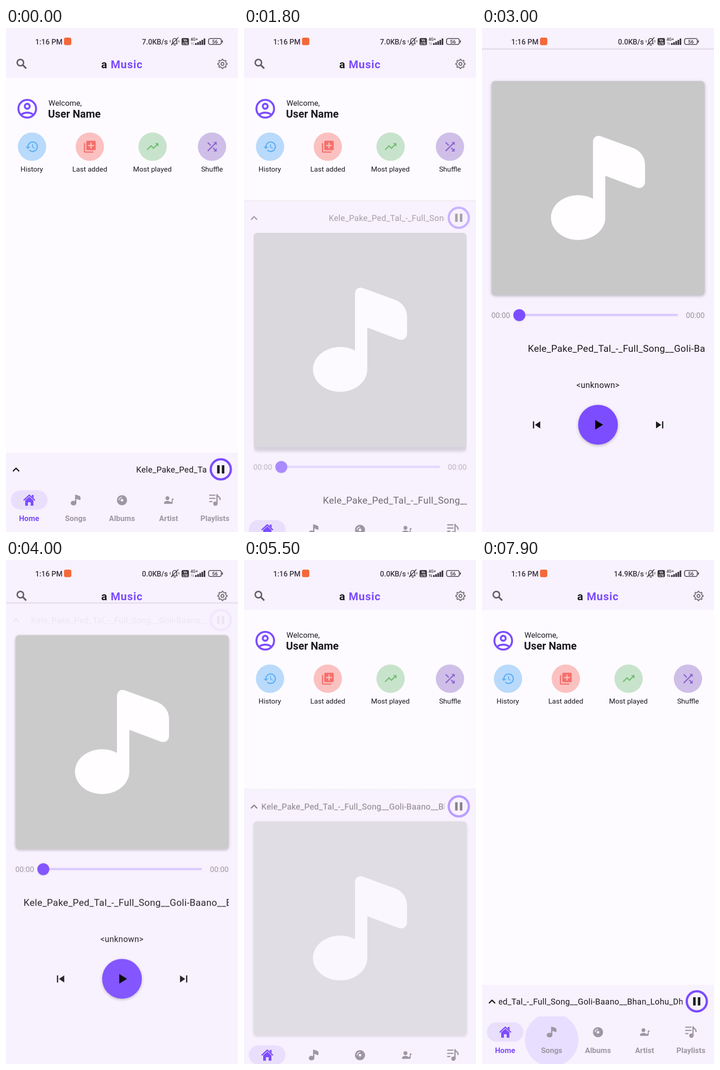
Animation, 508 px wide and 1102 px high, one loop 8000 ms. Source, as an HTML page:

```html
<!DOCTYPE html>
<html lang="en">
<head>
<meta charset="utf-8">
<title>Music player</title>
<style>
/* --p: how far the sheet is open; --m: marquee distance from its resting place */
@property --p { syntax: '<number>'; inherits: true; initial-value: 0; }
@property --m { syntax: '<number>'; inherits: true; initial-value: 247; }
html, body { margin: 0; width: 100%; height: 100%; overflow: hidden; background: #fdfbff; }
svg { display: block; width: 100vw; height: 100vh; font-family: Roboto, sans-serif; fill: #1c1b1f;
  animation: open 8s linear infinite, marquee 8s linear infinite; }
@keyframes open {
  0%, 6.9% { --p: 0; }
  11.25% { --p: .15; }
  17.5% { --p: .355; }
  27.5% { --p: .891; }
  31.5%, 46.5% { --p: 1; }
  50% { --p: .9456; }
  60% { --p: .7404; }
  78.75% { --p: .1905; }
  87.5%, 100% { --p: 0; }
}
@keyframes marquee {
  0% { --m: 247; }
  17.5% { --m: 168; }
  27.5% { --m: 127; }
  45% { --m: 40; }
  53.75%, 69% { --m: 0; }
  78.75% { --m: -38.5; }
  96.25%, 100% { --m: -108; }
}
.sheet { transform: translateY(calc(930px - 882px * var(--p))); }
.nav { transform: translateY(calc(998px + 104px * var(--p))); }
.full { opacity: var(--p); }
.mini { opacity: calc(1 - var(--p)); }
.mini-title { font-size: 18.1px; transform: translateX(calc(38px + 1px * var(--m))); }
.title { font-size: 20.7px; transform: translateX(calc(21px + 1.03px * var(--m))); }
.spaced { letter-spacing: .0179em; }
.raised { animation: shade 8s step-end infinite; }
.thumb { filter: drop-shadow(0 1px 1px rgba(0, 0, 0, .2)); }
/* while the sheet opens, shadows fall lower and are cut off at the sides */
@keyframes shade {
  0% { filter: drop-shadow(0 10px 3px rgba(0, 0, 0, .22)); clip-path: inset(0 0 -20px); }
  31.5%, 100% { filter: drop-shadow(0 2px 3px rgba(0, 0, 0, .25)); clip-path: inset(-20px); }
}
.rate { font-size: 15.8px; animation: 8s step-end infinite; }
.rate.a { animation-name: rate-a; }
.rate.b { animation-name: rate-b; }
.rate.c { animation-name: rate-c; }
@keyframes rate-a { 0% { opacity: 1; } 25%, 100% { opacity: 0; } }
@keyframes rate-b { 0% { opacity: 0; } 25% { opacity: 1; } 73.75%, 100% { opacity: 0; } }
@keyframes rate-c { 0% { opacity: 0; } 73.75%, 100% { opacity: 1; } }
.arrows { animation: arrows 8s step-end infinite; }
@keyframes arrows { 0% { opacity: .45; } 53%, 100% { opacity: 1; } }
.ripple { transform-origin: 152.5px 51px; animation: ripple 8s ease-out infinite; }
@keyframes ripple {
  0%, 93.4% { opacity: 0; transform: scale(.3); }
  94.8% { opacity: 1; transform: scale(.7); }
  96.5%, 100% { opacity: 1; transform: scale(1); }
}
.status { fill: #38343c; font-weight: 500; }
.purple { fill: #7c4dff; }
.bold { font-weight: 700; }
.mid { text-anchor: middle; }
.end { text-anchor: end; }
.line { fill: none; stroke: currentColor; stroke-linecap: round; stroke-linejoin: round; }
</style>
</head>
<body>
<svg viewBox="0 0 508 1102" preserveAspectRatio="none">
  <defs>
    <clipPath id="mini-clip"><rect x="37" width="402" height="72"/></clipPath>
    <clipPath id="title-clip"><rect x="21" y="620" width="467" height="70"/></clipPath>
    <clipPath id="nav-clip"><rect width="508" height="104"/></clipPath>
    <linearGradient id="edge" x2="0" y2="1">
      <stop stop-color="#000" stop-opacity="0"/>
      <stop offset="1" stop-color="#000" stop-opacity=".12"/>
    </linearGradient>
    <g id="note">
      <path d="M243 202C243 191 251 185 261 189L330 214C347 220 357 235 357 251V288C357 299 348 304 339 301L270 275V367H243Z"/>
      <ellipse cx="210.500" cy="366.500" rx="59.500" ry="49"/>
    </g>
  </defs>

  <rect width="508" height="1102" fill="#fdfbff"/>

  <!-- Home page -->
  <g class="line" color="#7c4dff" transform="translate(20.700 150.700) scale(2.15)" stroke-width="2">
    <circle cx="12" cy="12" r="9"/>
    <circle cx="12" cy="9.500" r="2.500"/>
    <path d="M6 18C7.400 16.700 9.500 16 12 16S16.600 16.700 18 18"/>
  </g>
  <text x="93" y="169.700" font-size="16.800">Welcome,</text>
  <text x="92" y="195.500" font-size="23.200" class="bold">User Name</text>

  <circle cx="57" cy="259.500" r="31" fill="#b9dafb"/>
  <circle cx="183.500" cy="259.500" r="31" fill="#fbc1c1"/>
  <circle cx="321" cy="259.500" r="31" fill="#c8e3cb"/>
  <circle cx="451" cy="259.500" r="31" fill="#cfbfe8"/>
  <path fill="#5fb0f5" transform="translate(41.500 244) scale(1.294)" d="M13 3a9 9 0 0 0-9 9H1l3.890 3.890.07.14L9 12H6c0-3.870 3.130-7 7-7s7 3.130 7 7-3.130 7-7 7c-1.930 0-3.680-.79-4.940-2.060l-1.420 1.420A8.950 8.950 0 0 0 13 21a9 9 0 0 0 0-18zm-1 5v5l4.280 2.540.72-1.210-3.500-2.080V8z"/>
  <path fill="#f4706c" transform="translate(168 244) scale(1.294)" d="M4 6H2v14c0 1.100.9 2 2 2h14v-2H4zm16-4H8c-1.100 0-2 .9-2 2v12c0 1.100.9 2 2 2h12c1.100 0 2-.9 2-2V4c0-1.100-.9-2-2-2zm-1 9h-4v4h-2v-4H9V9h4V5h2v4h4z"/>
  <path fill="#72bd77" transform="translate(305.500 244) scale(1.294)" d="M16 6l2.290 2.290-4.880 4.880-4-4L2 16.590 3.410 18l6-6 4 4 6.300-6.290L22 12V6z"/>
  <path fill="#8c65cf" transform="translate(435.500 244) scale(1.294)" d="M10.590 9.170L5.410 4 4 5.410l5.170 5.170zM14.500 4l2.040 2.040L4 18.590 5.410 20 17.960 7.460 20 9.500V4zm.33 9.410l-1.410 1.410 3.130 3.130L14.500 20H20v-5.500l-2.040 2.040z"/>
  <g class="mid" font-size="15.500">
    <text x="56.500" y="314">History</text>
    <text x="183.500" y="314">Last added</text>
    <text x="320.500" y="314">Most played</text>
    <text x="451" y="314">Shuffle</text>
  </g>

  <!-- Header and status bar -->
  <rect width="508" height="109" fill="#f8f1fe"/>
  <g fill="none" stroke="#65606a">
    <circle cx="31.500" cy="75.700" r="7" stroke-width="3.200"/>
    <path d="M36.500 80.700L44.300 88.500" stroke-width="3.800"/>
  </g>
  <text x="208.500" y="88" font-size="24" letter-spacing=".9" class="bold">a <tspan class="purple">Music</tspan></text>
  <g transform="translate(474 78.500)" fill="none" stroke="#65606a" stroke-width="2">
    <circle r="9" fill="#65606a" stroke="none"/>
    <circle r="9.600" stroke-width="2.800" pathLength="16" stroke-dasharray="1.100 .9" stroke-dashoffset=".55"/>
    <circle r="7.200" fill="#f8f1fe" stroke="none"/>
    <circle r="8" stroke="#f8f1fe" pathLength="16" stroke-dasharray=".5 1.500" stroke-dashoffset=".25"/>
    <circle r="3.200"/>
  </g>
  <g class="status">
    <text x="64" y="35.500" font-size="16">1:16 PM</text>
    <rect x="127" y="21" width="16" height="16.500" rx="4" fill="#f4683a"/>
    <g class="end">
      <text class="rate a" x="354.500" y="35.500">7.0KB/s</text>
      <text class="rate b" x="354.500" y="35.500">0.0KB/s</text>
      <text class="rate c" x="354.500" y="35.500">14.9KB/s</text>
    </g>
    <g class="line" color="#38343c" stroke-width="1.700">
      <path d="M363 34.500H375M365 34V28C365 21 374 21 374 28V34M368 37.500H371M362 37L377 21"/>
      <path d="M359.500 27V31M378.500 27V31" stroke-width="1.300"/>
    </g>
    <rect x="384.500" y="22" width="16" height="15.500" rx="3"/>
    <g class="mid bold" font-size="6.800" fill="#fff">
      <text x="392.500" y="29">Vo</text>
      <text x="392.500" y="35.700">LTE</text>
    </g>
    <text x="404" y="27.500" font-size="9">4G+</text>
    <path class="arrows line" color="#38343c" stroke-width="1.100" d="M407 36.500V31.500L405.500 33M410 31.500V36.500L411.500 35"/>
    <path d="M414 33h3.500v4h-3.500zM418.700 31h3.500v6h-3.500zM423.400 28.500h3.500v8.500h-3.500zM428.100 26h3.500v11h-3.500zM432.800 23h3.500v14h-3.500z"/>
    <rect x="443.500" y="23" width="28" height="13" rx="4" fill="none" stroke="#38343c" stroke-width="1.700"/>
    <rect x="473" y="27" width="1.800" height="5" rx=".9"/>
    <text x="457.500" y="33.500" font-size="11" class="mid">56</text>
  </g>

  <!-- Player sheet -->
  <g class="sheet">
    <rect class="full" y="-5" width="508" height="4" fill="url(#edge)"/>
    <rect y="-1" width="508" height="1102" fill="#f8f1fe"/>

    <g class="mini">
      <path class="line" color="#1c1b1f" stroke-width="2.600" stroke-linecap="butt" d="M16 38.500L22 32.500L28 38.500"/>
      <g clip-path="url(#mini-clip)">
        <text class="mini-title spaced" y="42">Kele_Pake_Ped_Tal_-_Full_Song__Goli-Baano__Bhan_Lohu_Dhakre</text>
      </g>
      <circle cx="470.300" cy="35" r="22" fill="none" stroke="#7c4dff" stroke-width="5"/>
      <path d="M462.300 26h5.500v18h-5.500zM472.600 26h5.500v18h-5.500z"/>
    </g>

    <g class="full">
      <g class="raised"><rect x="21" y="68" width="466.500" height="468" rx="8" fill="#c9c8c9"/></g>
      <use href="#note" fill="#fffdff"/>
      <g font-size="16.500" fill="#98929f">
        <text x="20.500" y="586">00:00</text>
        <text x="487.500" y="586" class="end">00:00</text>
      </g>
      <rect x="82" y="577" width="347" height="5" rx="2.500" fill="#d9caff"/>
      <circle class="purple thumb" cx="81.700" cy="579.700" r="13"/>
      <g clip-path="url(#title-clip)">
        <text class="title spaced" y="659.500">Kele_Pake_Ped_Tal_-_Full_Song__Goli-Baano__Bhan_Lohu_Dhakre</text>
      </g>
      <text x="254" y="738.500" font-size="18.100" class="mid spaced">&lt;unknown&gt;</text>
      <g class="raised"><circle class="purple" cx="254" cy="819.500" r="43.500"/></g>
      <path d="M248 809L265 819.500L248 830Z" fill="#000"/>
      <path d="M111.500 812h2.700v15.500h-2.700zM127.500 812v15.500L116 819.700z"/>
      <path d="M397 812h-2.700v15.500h2.700zM381 812v15.500L392.500 819.700z"/>
    </g>
  </g>

  <!-- Bottom navigation -->
  <g class="nav">
    <rect width="508" height="104" fill="#f8f1fe"/>
    <g clip-path="url(#nav-clip)"><circle class="ripple" cx="152.500" cy="51" r="58.500" fill="#e8deff"/></g>
    <rect x="10.500" y="13" width="80.500" height="42" rx="21" fill="#e9dffd"/>
    <g class="purple">
      <path d="M42 35L51 27L60 35V46.500H54V39H48V46.500H42Z"/>
      <path d="M56.500 23h4v7l-4-3.500z"/>
      <path class="line" color="#7c4dff" stroke-width="2.800" d="M39.500 34L51 23.500L62.500 34"/>
    </g>
    <g fill="#9d97a3">
      <use href="#note" transform="translate(126 2.800) scale(.104)"/>
      <circle cx="254" cy="34.500" r="11"/>
      <g fill="none" stroke="#f8f1fe" stroke-width="1.700">
        <circle cx="254" cy="34.500" r="2" fill="#f8f1fe"/>
        <path d="M247.500 34.500A6.500 6.500 0 0 1 254 28"/>
      </g>
      <circle cx="353.500" cy="30" r="4.300"/>
      <path d="M346 42.500V40.500C346 34.500 361 34.500 361 40.500V42.500Z"/>
      <path d="M363 31h4v2.500h-2v6.500a2.400 2.400 0 1 1-2-2.300z"/>
      <g class="line" color="#9d97a3" stroke-width="2.600">
        <path d="M446 23.500H457.500M446 30.500H457.500M446 37.500H451"/>
        <path d="M462 42V22.500C462.500 27 469 26 468.700 33" stroke-width="2.800"/>
      </g>
      <circle cx="458.500" cy="42" r="4.800"/>
      <g class="mid bold" font-size="16.500">
        <text x="50.500" y="80" class="purple">Home</text>
        <text x="152.500" y="80">Songs</text>
        <text x="254" y="80">Albums</text>
        <text x="356" y="80">Artist</text>
        <text x="457.500" y="80">Playlists</text>
      </g>
    </g>
  </g>
</svg>
</body>
</html>
```
